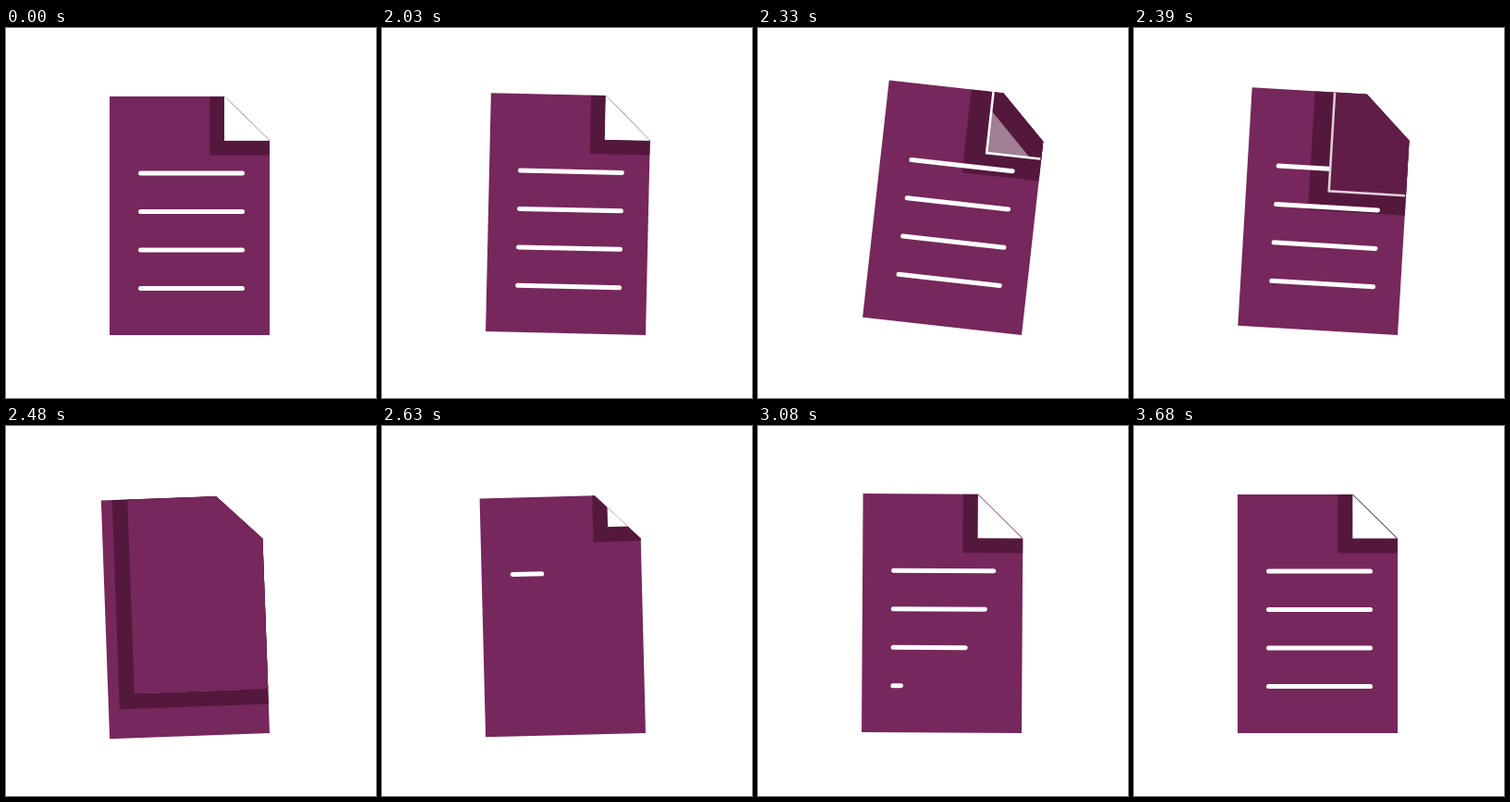
Animation of 400x400 px, one loop 4.43 s. Source, as an HTML page with a canvas:

```html
<!DOCTYPE html>
<html lang="en">
<head>
<meta charset="utf-8">
<title>Turning page</title>
<style>
  html, body { margin: 0; height: 100%; overflow: hidden; background: #fff; }
  canvas { display: block; }
</style>
</head>
<body>
<canvas id="stage" width="400" height="400"></canvas>
<script>
const ctx = document.getElementById('stage').getContext('2d');
const LOOP = 4430, START = 2030, END = 3680, STEP = 30;
const PURPLE = '#76275b', DARK = '#54183d';
const page = { left: 112, top: 74, right: 285, bottom: 332 };
const cut = { x: 236.3, y: 121.5 };          // resting corner of the fold
const leg = 48;
const lineTops = [154.5, 196, 237.5, 279];
const lineStarts = [2557, 2724, 2860, 3055];

const lerp = (a, b, p) => a + (b - a) * p;
const span = (t, from, to) => Math.min(1, Math.max(0, (t - from) / (to - from)));
const outPow = (p, n) => 1 - (1 - p) ** n;
const swing = p => (1 - Math.cos(Math.PI * p)) / 2;

function tilt(t) {
  if (t < 2300) return 6.8 * outPow(span(t, 2000, 2300), 2);
  if (t < 2525) return lerp(6.8, -3, swing(span(t, 2300, 2525)));
  if (t < 2800) return lerp(-3, 1.9, swing(span(t, 2525, 2800)));
  return lerp(1.9, 0, swing(span(t, 2800, 3190)));
}

function shape(points) {
  ctx.beginPath();
  points.forEach(([x, y]) => ctx.lineTo(x, y));
  ctx.closePath();
}

function fillShape(color, points) {
  ctx.fillStyle = color;
  shape(points);
  ctx.fill();
}

// Rectangle from a lower left corner to the top right of the page
function flap(color, x, y, top = page.top) {
  fillShape(color, [[x, top], [page.right + 1, top], [page.right + 1, y], [x, y]]);
}

function triangle(x, y) {
  fillShape('#fff', [[x, y - leg], [x, y], [x + leg + 1, y]]);
}

function textLines(grow) {
  ctx.fillStyle = '#fff';
  lineTops.forEach((y, i) => {
    const w = 115 * grow(i);
    if (w <= 0) return;
    ctx.beginPath();
    ctx.roundRect(143, y, w, 5, 2.5);
    ctx.fill();
  });
}

// The fold sweeps over the written page and uncovers a blank one
function turnPage(t) {
  const p = span(t, 2249, 2512) ** 2;
  const x = lerp(cut.x, page.left, p), y = lerp(cut.y, page.bottom, p);
  const margin = t < 2330 ? lerp(16, 23, span(t, 2200, 2330))
                          : lerp(23, 16.5, span(t, 2330, 2480));
  flap(DARK, x - margin, y + margin);
  textLines(() => 1);
  flap(DARK, x, y);
  ctx.globalAlpha = span(t, 2350, 2460);
  flap(PURPLE, x, y);
  ctx.globalAlpha = 1 - span(t, 2255, 2390);
  triangle(x, y);
  ctx.globalAlpha = 1 - span(t, 2370, 2470);
  ctx.strokeStyle = '#fff';
  ctx.lineWidth = 2.5;
  ctx.beginPath();
  ctx.moveTo(x + 1, page.top);
  ctx.lineTo(x + 1, y - 1);
  ctx.lineTo(page.right - 1, y - 1);
  ctx.stroke();
  ctx.globalAlpha = 1;
}

// A new fold slides in and the lines are written one after another
function writePage(t) {
  const shift = leg * (1 - outPow(span(t, 2540, 2800), 3));
  const x = cut.x + shift, y = cut.y - shift;
  flap(DARK, x - 16, y + 16, page.top - shift);
  triangle(x, y);
  textLines(i => t >= END ? 1 : outPow(span(t, lineStarts[i], lineStarts[i] + 800), 4));
}

function crease(color, width) {
  ctx.strokeStyle = color;
  ctx.lineWidth = width;
  ctx.beginPath();
  ctx.moveTo(cut.x, page.top);
  ctx.lineTo(page.right - 0.5, cut.y);
  ctx.stroke();
}

function draw(t) {
  ctx.fillStyle = '#fff';
  ctx.fillRect(0, 0, 400, 400);
  ctx.save();
  ctx.translate(page.right, page.bottom);
  ctx.rotate(tilt(t) * Math.PI / 180);
  ctx.translate(-page.right, -page.bottom);

  ctx.save();
  shape([[page.left, page.top], [cut.x, page.top], [page.right, cut.y],
         [page.right, page.bottom], [page.left, page.bottom]]);
  ctx.clip();
  ctx.fillStyle = PURPLE;
  ctx.fillRect(page.left - 1, page.top - 1, 175, 260);
  t < 2520 ? turnPage(t) : writePage(t);
  ctx.restore();

  if (t < 2249) crease('#bbb', 0.6);
  else if (t >= 3200) crease('#222', 0.9);
  else if (t >= 2800) crease(PURPLE, 0.7);
  ctx.restore();
}

function frame(now) {
  const t = now % LOOP;
  const stepped = START + Math.floor((t - START) / STEP) * STEP;
  draw(t < START ? 0 : Math.min(stepped, END));
  requestAnimationFrame(frame);
}
frame(performance.now());
</script>
</body>
</html>
```
